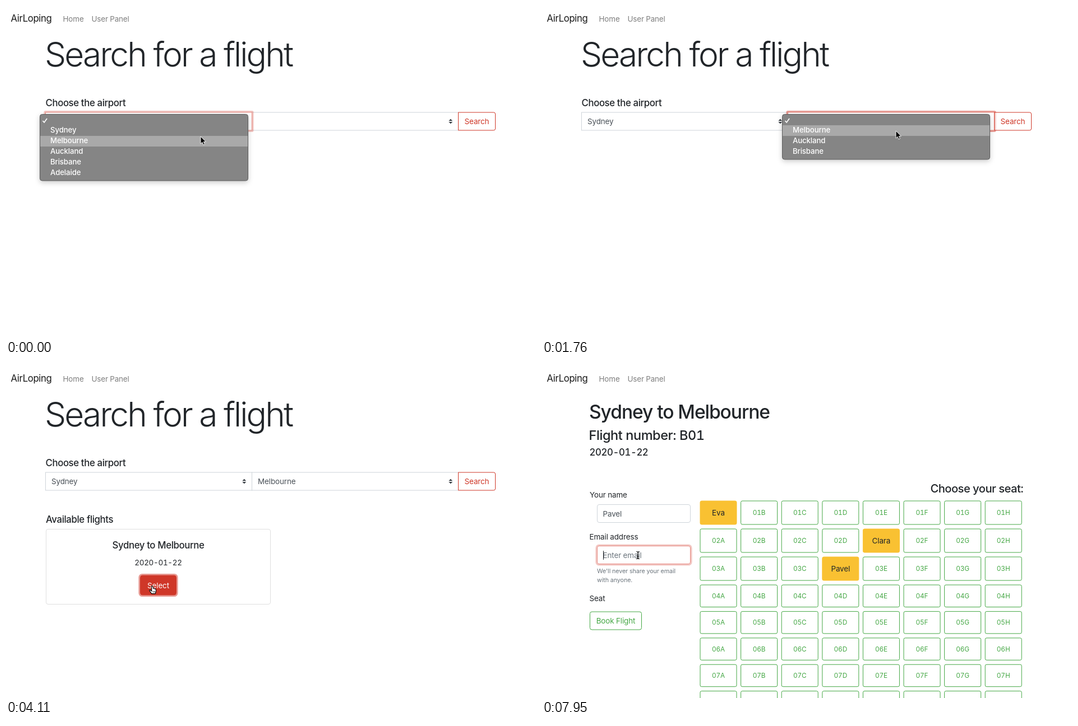
An HTML page that plays this animation: 945x593 px, repeating every 8 s.

```html
<!DOCTYPE html>
<html lang="en">
<head>
<meta charset="utf-8">
<title>Flight booking</title>
<style>
  html, body { margin: 0; width: 100%; height: 100%; overflow: hidden; background: #fff; }
  svg { display: block; width: 100vw; height: 100vh; }
  text {
    font-family: Inter, "Open Sans", sans-serif;
    font-optical-sizing: none;
    font-variant-numeric: tabular-nums;
    white-space: pre;
  }
</style>
</head>
<body>
<svg id="stage" viewBox="0 0 945 593"></svg>
<script>
const LOOP = 8000, FIRST_TICK = 150, TICK = 146.4;
const INK = '#212529', GREY = '#6c757d', FIELD = '#495057', LINE = '#ced4da';
const RED = '#cf3728', GREEN = '#44a744', YELLOW = '#f9c132';
const BODY = 13.43, HEAD = 16.8;
const stage = document.getElementById('stage');

// Pointer path: tick, x, y
const path = [
  [0, 347, 233], [2, 341, 222], [4, 341, 222], [8, 617, 208], [9, 617, 208],
  [11, 622, 222], [13, 640, 224], [15, 874, 238], [16, 868, 267], [18, 846, 210],
  [20, 846, 210], [22, 470, 464], [24, 470, 464], [27, 261, 393], [31, 261, 393],
  [33, 498, 392], [34, 506, 396], [35, 506, 396], [39, 216, 268], [50, 216, 268],
  [53, 171, 338], [55, 171, 338]
];

function pointerAt(n) {
  const i = path.findIndex(p => p[0] > n);
  const [t0, x0, y0] = path[i - 1], [t1, x1, y1] = path[i];
  const k = (n - t0) / (t1 - t0);
  return { x: x0 + (x1 - x0) * k, y: y0 + (y1 - y0) * k };
}

const between = (n, from, to) => n >= from && n < to;
const inside = (p, b, pad = 0) =>
  p.x >= b.x - pad && p.x <= b.x + b.w + pad && p.y >= b.y - pad && p.y <= b.y + b.h + pad;
const box = (x, y, w, h) => ({ x, y, w, h });

function text(x, y, str, size = BODY, { fill = INK, weight = 400, anchor = 'start', tracking } = {}) {
  const spacing = tracking ?? (size < 14 ? -0.008 : -0.014 - size * 0.00054);
  return `<text x="${x}" y="${y}" font-size="${size}" font-weight="${weight}" fill="${fill}"
    text-anchor="${anchor}" letter-spacing="${spacing * size}">${str}</text>`;
}

function rect({ x, y, w, h }, fill, stroke = 'none', r = 0, extra = '') {
  return `<rect x="${x}" y="${y}" width="${w}" height="${h}" rx="${r}" fill="${fill}" stroke="${stroke}" ${extra}/>`;
}

function ring(b, r, alpha = 0.28) {
  const grown = box(b.x - 1.7, b.y - 1.7, b.w + 3.4, b.h + 3.4);
  return rect(grown, 'none', RED, r + 1.7, `stroke-width="2.8" stroke-opacity="${alpha}"`);
}

const field = (b, focused, r) =>
  rect(b, '#fff', focused ? '#e88f87' : LINE, r) + (focused ? ring(b, r) : '');

// Search page
const fromBox = box(70.5, 190, 368, 32), toBox = box(438.5, 190, 368, 32);
const searchBox = box(806.5, 190, 66, 32), selectBox = box(239.5, 374, 64, 35);

function select(b, value, focused) {
  return field(b, focused, 0) + text(b.x + 10.5, 211, value, BODY, { fill: FIELD }) +
    `<path transform="translate(${b.x + 350.8} 201.7) scale(1.733)" d="M2 0L0 2h4zm0 5L0 3h4z" fill="#343a40"/>`;
}

function menu(x, width, cities, pointer) {
  const active = Math.floor((pointer.y - 194) / 19);
  const rows = cities.map((city, i) => text(x + 18.5, 225.6 + i * 19, city, 13.2, { fill: '#fff', weight: 500 }));
  return rect(box(x, 193.5, width, 24 + cities.length * 19 - 0.5), '#858585', '#5c5c5c', 4,
      'style="filter:drop-shadow(0 3px 5px rgba(0,0,0,.2))"') +
    rect(box(x + 0.5, 194 + active * 19, width - 1, 19), '#a9a9a9') +
    `<path d="M${x + 5} 205l2.6 3 5-7" fill="none" stroke="#fff" stroke-width="1.7"/>` + rows.join('');
}

function searchPage(n, p) {
  const overSearch = inside(p, searchBox);
  const { x, y, w, h } = searchBox;
  const searchShape = `M${x} ${y}h${w - 3}q3 0 3 3v${h - 6}q0 3-3 3h${3 - w}z`;
  let out = text(69, 108, 'Search for a flight', 60.4, { weight: 300 }) +
    text(70.5, 178.5, 'Choose the airport', HEAD, { weight: 500 });

  const first = () => select(fromBox, n >= 5 ? 'Sydney' : '', n < 9);
  const second = () => select(toBox, n >= 16 ? 'Melbourne' : '', between(n, 9, 19));
  out += n < 9 ? second() + first() : first() + second();
  out += `<path d="${searchShape}" fill="${overSearch ? RED : '#fff'}" stroke="${RED}"/>` +
    text(839.5, 211, 'Search', BODY, { fill: overSearch ? '#fff' : RED, anchor: 'middle' });
  if (between(n, 9, 19)) out += ring(toBox, 0);
  if (between(n, 19, 28)) out += ring(searchBox, 3, 0.5);

  if (n >= 20) {
    out += text(71, 280, 'Available flights', HEAD, { weight: 500 }) +
      rect(box(71.5, 291.5, 400, 134), '#fff', '#dfdfdf', 3.5) +
      text(271.5, 326, 'Sydney to Melbourne', HEAD, { weight: 500, anchor: 'middle' }) +
      text(271.5, 356, '2020-01-22', BODY, { anchor: 'middle', tracking: -0.02 }) +
      rect(selectBox, RED, RED, 3.5) + (n >= 28 ? ring(selectBox, 3.5, 0.5) : '') +
      text(271.5, 396.5, 'Select', BODY, { fill: '#fff', anchor: 'middle' });
  }
  if (n < 5) out += menu(60.5, 371, ['Sydney', 'Melbourne', 'Auckland', 'Brisbane', 'Adelaide'], p);
  if (between(n, 9, 14)) out += menu(428.5, 370, ['Melbourne', 'Auckland', 'Brisbane'], p);
  return out;
}

// Seat page
const nameBox = box(98.5, 247.5, 166, 32), emailBox = box(98.5, 321.5, 166, 32);
const bookBox = box(85.5, 439, 92, 32);
const booked = { '01A': 'Eva', '02E': 'Clara', '03D': 'Pavel' };
const seats = [];
for (let row = 0; row < 8; row++) {
  for (let col = 0; col < 8; col++) {
    const y = row < 3 ? 241 + row * 50 : 391 + (row - 3) * 47.4;
    seats.push({
      ...box(282 + col * 72.6, y, 65, row < 3 ? 42 : 39.5),
      label: `0${row + 1}${'ABCDEFGH'[col]}`
    });
  }
}

function seat(s, p) {
  const owner = booked[s.label], hover = !owner && inside(p, s, 2);
  const color = owner ? YELLOW : GREEN;
  const middle = s.y + s.h / 2;
  return rect(s, owner || hover ? color : '#fff', color, 2.6) +
    text(s.x + 32.5, middle + (owner ? 5 : 4), owner || s.label, owner ? BODY : 11.75,
      { fill: owner ? INK : hover ? '#fff' : GREEN, anchor: 'middle' });
}

function seatPage(n, p) {
  const typed = 'Pavel'.slice(0, n < 45 ? 0 : n < 47 ? 1 : n < 48 ? 2 : n < 49 ? 4 : 5);
  const nameFocus = between(n, 40, 53), emailFocus = n >= 53;
  const caret = y => rect(box(109, y, 1, 16), INK);
  const typedCaret = nameFocus ? `<tspan dx="-1.5" font-weight="200">|</tspan>` : '';
  return text(84, 94, 'Sydney to Melbourne', 33.6, { weight: 500 }) +
    text(83.5, 132, 'Flight number: B01', 23.5, { weight: 500, tracking: -0.018 }) +
    text(84.5, 160, '2020-01-22', HEAD, { weight: 500 }) +
    text(692.5, 226, 'Choose your seat:', 20.1, { weight: 500 }) +
    text(85, 235, 'Your name') +
    field(nameBox, nameFocus, 3.5) +
    text(108.5, 269, typed ? typed + typedCaret : 'Enter Name', BODY, { fill: typed ? FIELD : GREY }) +
    (between(n, 40, 44) ? caret(256) : '') +
    text(84.5, 309.5, 'Email address') +
    field(emailBox, emailFocus, 3.5) +
    text(108.5, 343, 'Enter email', BODY, { fill: GREY }) +
    (emailFocus ? caret(330) : '') +
    text(98, 370, "We'll never share your email", 10.75, { fill: GREY }) +
    text(98, 386, 'with anyone.', 10.75, { fill: GREY }) +
    text(84.5, 419.5, 'Seat') +
    rect(bookBox, '#fff', GREEN, 3.5) +
    text(131.5, 460, 'Book Flight', BODY, { fill: GREEN, anchor: 'middle' }) +
    seats.map(s => seat(s, p)).join('');
}

// Pointer shapes, drawn around their hot spot
const shapes = {
  arrow: '<path d="M0 0V13.2L3 10.4 5 15 7.3 14 5.3 9.6H9.3Z" fill="#000" stroke="#fff" stroke-width=".9"/>',
  hand: `<path d="M-1.6 .8Q-.4-1 .8.8L1.4 4.2Q2.6 3.4 3.3 4.7 4.4 4.1 5 5.4 6.4 5.2 6.4 7V10L5.2 13.6H-1.4
    L-5 8.6Q-5.6 6.8-3.6 7.2L-1.2 9Z" fill="#fff" stroke="#000" stroke-width="1.1"/>
    <path d="M1.2 9v2.6M3 9v2.6M4.6 9v2.6" stroke="#000" stroke-width=".7"/>`,
  beam: '<path d="M-2.8-6.5Q0-6.5 0-4.8 0-6.5 2.8-6.5M0-5V5.5M-2.8 6.5Q0 6.5 0 4.8 0 6.5 2.8 6.5M-1.5 2H1.5" fill="none" stroke="#000" stroke-width="1.2"/>'
};

function pointer(n, p) {
  const over = b => inside(p, b);
  let shape = 'arrow';
  if (n < 29) {
    if (over(searchBox) || (n >= 20 && over(selectBox))) shape = 'hand';
  } else if (n >= 31) {
    if (over(nameBox) || over(emailBox)) shape = 'beam';
    else if (seats.some(over)) shape = 'hand';
  }
  return `<g transform="translate(${p.x} ${p.y})">${shapes[shape]}</g>`;
}

function render(n) {
  const p = pointerAt(n);
  const loading = between(n, 29, 31);
  const nav = text(8.5, 28, 'AirLoping', HEAD, { fill: '#191919' }) +
    text(101.5, 27.5, 'Home', BODY, { fill: '#7f7f7f' }) +
    text(152.5, 27.5, 'User Panel', BODY, { fill: '#7f7f7f', tracking: -0.012 });
  const status = rect(box(-4, 579.5, 316, 20), '#555', '#484848', 3) +
    text(0, 592, 'https://pages.example.test/flights/14', 10.37, { fill: '#bbb', tracking: 0 });
  stage.innerHTML = (loading ? '' : nav + (n < 29 ? searchPage(n, p) : seatPage(n, p))) +
    (between(n, 29, 34) ? status : '') + pointer(n, p);
}

let shown = -1;
function frame() {
  const t = performance.now() % LOOP;
  const n = t < FIRST_TICK ? 0 : Math.min(54, 1 + Math.floor((t - FIRST_TICK) / TICK));
  if (n !== shown) render(shown = n);
  requestAnimationFrame(frame);
}
frame();
</script>
</body>
</html>
```
